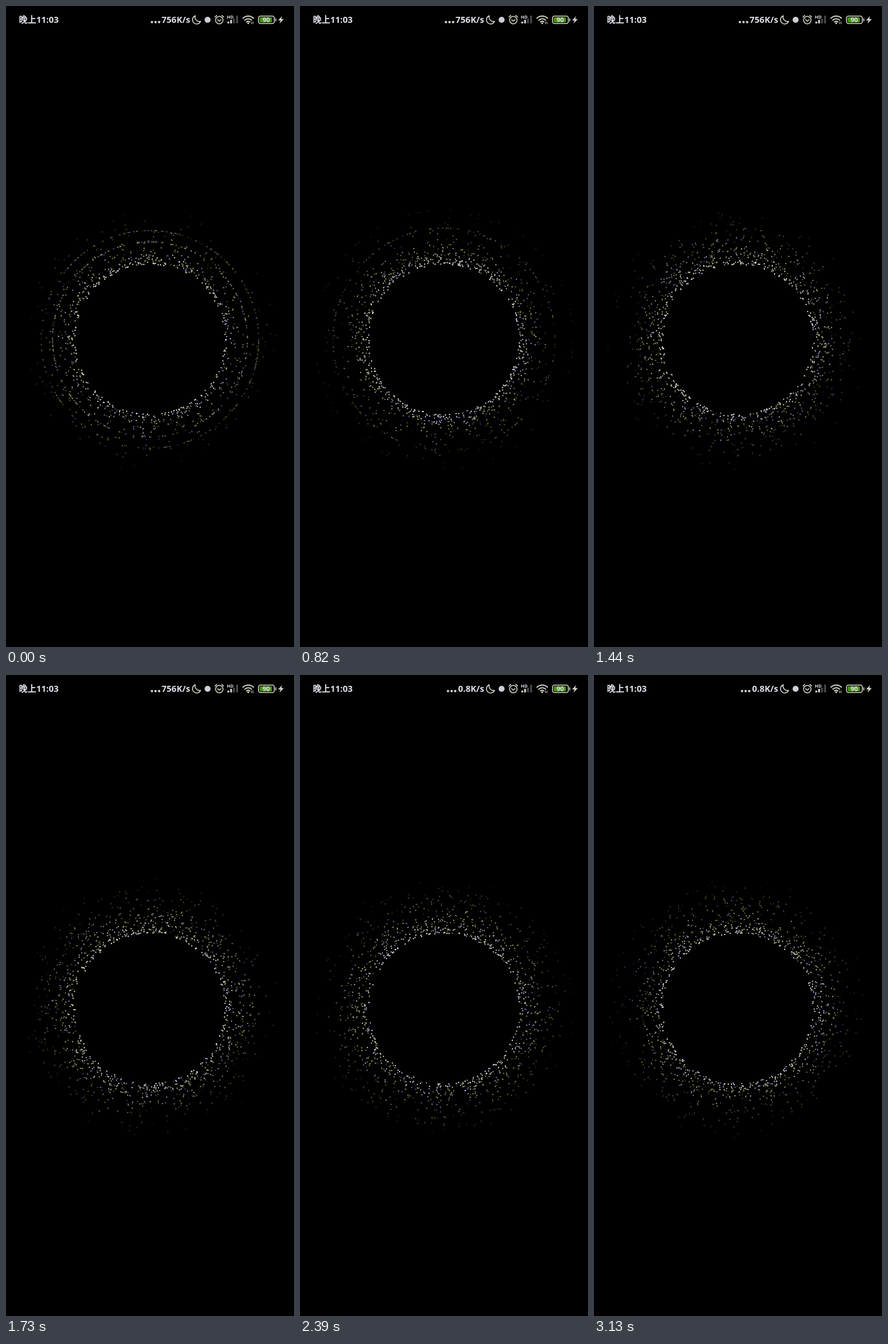
Recreate the animation shown at these times as an HTML page with a canvas. Size 480 by 1067 pixels, loop 3170 ms.

```html
<!DOCTYPE html>
<html lang="zh">
<head>
<meta charset="utf-8">
<style>
html, body { margin: 0; width: 100%; height: 100%; overflow: hidden; background: #000; }
canvas, svg { position: absolute; left: 0; top: 0; }
text { font: bold 14.5px "Noto Sans", "Noto Sans CJK SC", "Noto Sans CJK", sans-serif; fill: #e4e0ea; }
.line { fill: none; stroke: #cfcdc0; stroke-width: 1.6; stroke-linecap: round; stroke-linejoin: round; }
.solid { fill: #d8d6cc; }
</style>
</head>
<body>
<canvas id="stage" width="480" height="1067"></canvas>
<svg width="480" height="46">
  <text x="21.5" y="28.3">晚上11:03</text>
  <g id="dots" class="solid">
    <circle cx="243.2" cy="26.8" r="2"/><circle cx="249.2" cy="26.8" r="2"/><circle cx="255.2" cy="26.8" r="2"/>
  </g>
  <text id="speed" x="307" y="28.3" text-anchor="end">756K/s</text>
  <path class="line" d="M315.5 16.3A7 7 0 1 0 324.3 25.5A7.2 7.2 0 0 1 315.5 16.3Z"/>
  <circle cx="336" cy="23" r="5" fill="#cfcdd6"/>
  <g class="line">
    <circle cx="355.5" cy="23.5" r="6.2"/>
    <path d="M348.3 18.3l3-2.6M362.7 18.3l-3-2.6M352.8 22.8l2.7 2.3 2.9-2.3"/>
  </g>
  <text x="368" y="20.6" style="font-size:7.5px">HD</text>
  <path class="solid" d="M369 26h3v3h-3zM373.6 23h3v6h-3z"/>
  <path fill="#4c4c4c" d="M378.4 21h3v8h-3zM383.6 16h3v13h-3z"/>
  <g class="line" style="stroke-width:2">
    <path d="M395 20.3a12.3 12.3 0 0 1 17.4 0M398 23.6a8 8 0 0 1 11.4 0M401 26.6a4 4 0 0 1 5.4 0"/>
  </g>
  <circle class="solid" cx="403.7" cy="28.8" r="1.5"/>
  <path class="line" style="stroke-width:1" d="M409.3 29.8v-3.4M411.8 26.4v3.4"/>
  <rect class="line" x="420.8" y="16.8" width="26.4" height="12.4" rx="3.4"/>
  <rect x="422.8" y="18.8" width="20.4" height="8.4" rx="1.5" fill="#479612"/>
  <path class="solid" d="M448.8 20.5h1.6v5h-1.6z"/>
  <text x="433.8" y="26.8" text-anchor="middle" style="font-size:10.5px">90</text>
  <path class="solid" d="M460 16.8L453.6 24h4l-1.6 5.3 7-7.6h-4.2z"/>
</svg>
<script>
const LOOP = 3170, HOLD = 450, STEP = 41.23;
const START_AGE = 0.617, SPEED_CHANGE = 2350;
const CX = 240, CY = 555, RADIUS = 124.8, REACH = 106;
const ctx = document.getElementById('stage').getContext('2d');
const speed = document.getElementById('speed');
const dots = document.getElementById('dots');

let seed = 20211;
function random() {
  seed = (seed * 1664525 + 1013904223) >>> 0;
  return seed / 4294967296;
}

// Half of the particles start together in two bursts, the rest at random phases.
const particles = Array.from({ length: 1450 }, () => {
  const kind = random();
  return {
    angle: random() * Math.PI * 2,
    reach: 1 + REACH * random() ** 0.75,
    burst: kind < 0.2 ? 61 : kind < 0.5 ? 91.5 : 0,
    speed: 30 + 100 * random(),
    phase: random(),
    violet: random() < 0.3
  };
});

function offsetAt(p, age) {
  if (!p.burst) return (p.phase * p.reach + p.speed * age) % p.reach;
  const firstLife = p.reach / p.burst;
  return age < firstLife ? p.burst * age : ((age - firstLife) * p.speed) % p.reach;
}

function tint(v, violet) {
  const warm = violet ? v * 0.82 : v;
  const blue = violet ? v ** 0.8 : v ** 1.7;
  return `rgb(${warm * 255},${warm * 255},${blue * 255})`;
}

function drawParticles(age) {
  ctx.fillStyle = '#000';
  ctx.fillRect(0, 0, 480, 1067);
  for (const p of particles) {
    const offset = offsetAt(p, age);
    const light = 0.93 * (1 - offset / p.reach);
    if (light < 0.08) continue;
    const r = RADIUS + offset;
    ctx.fillStyle = tint(light, p.violet);
    ctx.beginPath();
    ctx.arc(CX + Math.cos(p.angle) * r, CY + Math.sin(p.angle) * r, 1.12, 0, 7);
    ctx.fill();
  }
}

function frame() {
  const t = performance.now() % LOOP;
  const step = t < HOLD ? 0 : Math.floor((t - HOLD) / STEP) + 1;
  drawParticles(START_AGE + step * STEP / 1000);
  const slow = t >= SPEED_CHANGE;
  speed.textContent = slow ? '0.8K/s' : '756K/s';
  dots.setAttribute('transform', `translate(${slow ? 3.5 : 0})`);
  requestAnimationFrame(frame);
}
frame();
</script>
</body>
</html>
```
